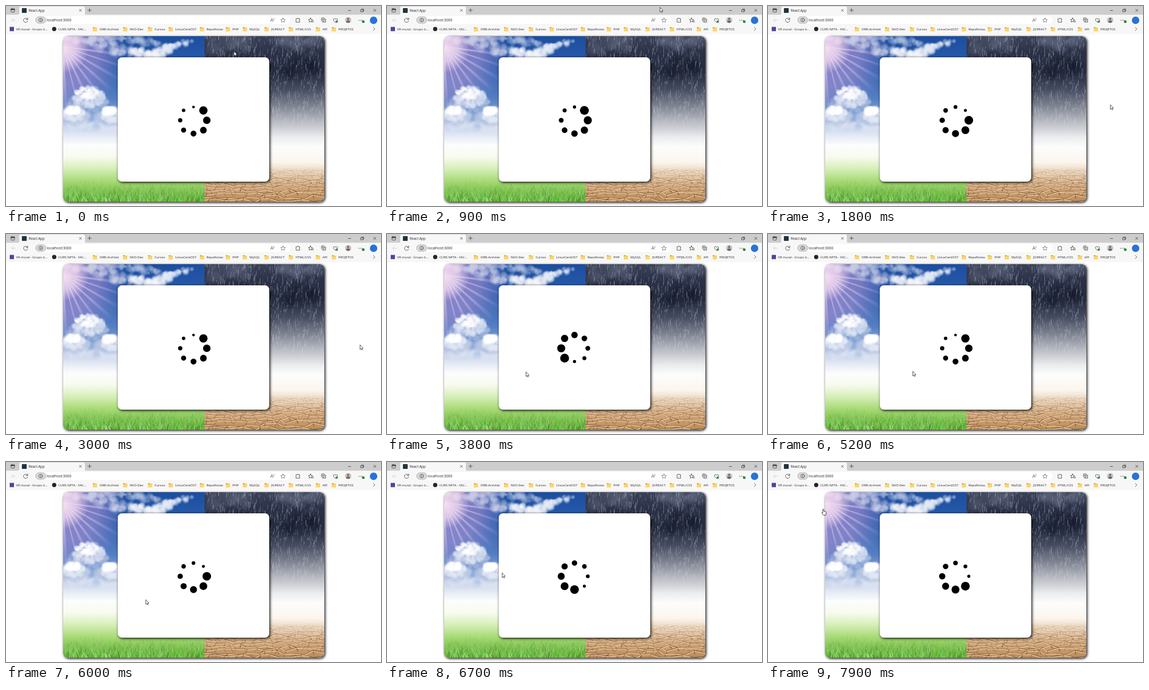
Recreate the animation shown at these times as an HTML page with a canvas. Size 708 by 378 pixels, loop 8000 ms.

```html
<!DOCTYPE html>
<html lang="pt">
<head>
<meta charset="utf-8">
<title>React App</title>
<style>
html, body { margin: 0; width: 708px; height: 378px; overflow: hidden; background: #fff; }
body { position: relative; font-family: "Open Sans", "Noto Sans", sans-serif; }
svg { position: absolute; left: 0; top: 0; }
.card { position: absolute; left: 107.5px; top: 57px; width: 493px; height: 313px; border-radius: 9px; box-shadow: 1.500px 1.500px 5px #000; }
.panel { position: absolute; left: 211px; top: 96.500px; width: 286px; height: 235.500px; border-radius: 8px; background: #fff; box-shadow: 1.500px 1.500px 5px #000; }
.line { fill: none; stroke: #333; stroke-width: .8; stroke-linecap: round; stroke-linejoin: round; }
#marks text { font-size: 6.1px; fill: #222; }
</style>
</head>
<body>
<canvas class="card" id="scene" width="493" height="313"></canvas>
<div class="panel"></div>

<svg width="708" height="378" viewBox="0 0 708 378">
  <rect width="708" height="17" fill="#cdcdcd"/>
  <rect y="16.5" width="708" height="36.5" fill="#f7f7f7"/>
  <path d="M22 17q3 0 3-3V4q0-3 3-3H146q3 0 3 3v10q0 3 3 3z" fill="#f7f7f7"/>
  <rect x="30" y="4" width="9" height="9" rx="1" fill="#20343d"/>
  <text x="43" y="10.6" font-size="6.4" fill="#222">React App</text>
  <rect x="53" y="19" width="484" height="15" rx="7.5" fill="#fff"/>
  <rect x="55.500" y="20" width="20" height="13" rx="6.5" fill="#d6d6d6" stroke="#aaa" stroke-width=".7"/>
  <text x="77" y="29.300" font-size="6.9" fill="#222">localhost:3000</text>

  <g class="line">
    <rect x="9.500" y="5" width="6.500" height="6.500" rx="1.200"/><path d="M9.500 6.500h6.500" stroke-width="2"/>
    <path d="M138.500 6.300l4 4m0-4l-4 4M154.500 8h6.500m-3.250-3.250v6.500"/>
    <path d="M646 8.500h5M670 7h4v4h-4zM671.300 7V5.800h4v4H674M694 6l4.500 4.500m0-4.500L694 10.500"/>
    <path d="M18 27h-7.500l3-3m-3 3l3 3" stroke="#c9c9c9"/>
    <path d="M40.600 25A4 4 0 1 0 41 28M41 22.500V25.500H38"/>
    <circle cx="65.500" cy="26.500" r="3.500" stroke-width=".7"/><path d="M65.500 26v2.400M65.500 24.500v.1"/>
    <path d="M499.500 29.500l2.500-6 2.500 6m-4.200-2h3.400M505.500 23q1.500 1.500 0 3.500" stroke="#666"/>
    <path d="M523 22.500l1.300 2.800 3.100.4-2.300 2.100.6 3-2.700-1.500-2.700 1.500.6-3-2.300-2.100 3.100-.4z" stroke="#666"/>
    <path d="M548 24h2q1-3 2 0h2.500v2q-3 .8 0 2v2.500H548z"/>
    <path d="M575 22.500l1.300 2.800 2.500.4-2 2 .4 2.600-2.200-1.300-2.700 1.500.6-3-2-1.800 2.800-.4zM578 28h2.500m-2 2h2"/>
    <rect x="595.500" y="22.500" width="6" height="6" rx="1.200"/><path d="M597.500 30.500h6v-6M598.500 24v3m-1.500-1.500h3"/>
    <path d="M622 31l-3.500-3.500q-1.200-4 2-3.800l1.500 1.300q1.500-2 3.500-.5 1.500 1.800 0 3.500z"/>
    <path d="M666 27h.1m2.900 0h.1m2.900 0h.1" stroke-width="1.300"/>
    <path d="M693.500 40.500l3 3-3 3"/>
  </g>
  <circle cx="624.500" cy="29.500" r="2.200" fill="#3b8c3f"/>
  <circle cx="646" cy="26.500" r="5.800" fill="#c4c1bf"/>
  <circle cx="646" cy="24.600" r="2" fill="#6d6966"/>
  <path d="M642.200 30.500q0-3.300 3.800-3.300t3.800 3.300q-3.800 2.800-7.600 0z" fill="#6d6966"/>
  <circle cx="674.500" cy="29.500" r="2.600" fill="#2f8b3a"/>
  <circle cx="694" cy="27" r="7" fill="#2872d8"/>

  <g id="marks">
    <rect x="7" y="39.500" width="8" height="8" fill="#50439b"/>
    <text x="19" y="46">VR mural - Grupo ó...</text>
    <circle cx="91" cy="43.500" r="4" fill="#252525"/>
    <text x="99" y="46">CURS NPTA - FAC...</text>
  </g>

  <g id="dots"></g>
  <g id="cursor">
    <path id="arrow" d="M.4.500V9.300L2.400 7.500 3.700 10.300 5 9.700 3.800 7H6.300z" fill="#fff" stroke="#222" stroke-width=".8" stroke-linejoin="round"/>
    <path id="hand" d="M2.500 7V1.500q1-1.500 2 0V5l3.500 1q1 .3 1 1.500L8 12.500H4L.6 8.500Q.4 6.500 2.500 8z" fill="#fff" stroke="#222" stroke-width=".9" stroke-linejoin="round"/>
  </g>
</svg>

<script>
const $ = id => document.getElementById(id);
const svgNode = (tag, attrs, parent) => {
  const node = document.createElementNS('http://www.w3.org/2000/svg', tag);
  for (const key in attrs) node.setAttribute(key, attrs[key]);
  return parent.appendChild(node);
};

// Bookmark folders
const folders = {
  'ORB-Architet': 164, 'NVO-Dev': 221, 'Cursos': 268, 'LinuxCentOS7': 307,
  'RepoNotas': 366, 'PHP': 415, 'MySQL': 447, 'JS/REACT': 488,
  'HTML/CSS': 534, 'API': 585, 'PROJETOS': 615
};
for (const name in folders) {
  const x = folders[name];
  svgNode('path', { d: `M${x} 40h3l1 1.200h4v6.300H${x}z`, fill: '#e2a92c' }, $('marks'));
  svgNode('rect', { x, y: 42, width: 8, height: 5.5, rx: .6, fill: '#ffd664' }, $('marks'));
  svgNode('text', { x: x + 12.5, y: 46 }, $('marks')).textContent = name;
}

// Weather backdrop
const ctx = $('scene').getContext('2d');
const SPLIT = 267, W = 493, H = 313;
let seed = 7;
const rand = (lo = 0, hi = 1) => {
  seed = (seed * 16807) % 2147483647;
  return lo + (hi - lo) * seed / 2147483647;
};
function sky(x, w, stops) {
  const g = ctx.createLinearGradient(0, 0, 0, H);
  for (const [at, color] of stops) g.addColorStop(at, color);
  ctx.fillStyle = g;
  ctx.fillRect(x, 0, w, H);
}
function puff(x, y, r, rgb, alpha) {
  const g = ctx.createRadialGradient(x, y, 0, x, y, r);
  g.addColorStop(0, `rgba(${rgb},${alpha})`);
  g.addColorStop(.55, `rgba(${rgb},${alpha * .7})`);
  g.addColorStop(1, `rgba(${rgb},0)`);
  ctx.fillStyle = g;
  ctx.fillRect(x - r, y - r, 2 * r, 2 * r);
}
// Ragged cloud: small puffs spread over a tilted ellipse
function cloud(x, y, w, h, n, rgb, alpha = .5, tilt = 0, size = 8) {
  ctx.save();
  ctx.translate(x, y);
  ctx.rotate(tilt);
  for (let i = 0; i < n; i++) {
    const a = rand(0, 2 * Math.PI), d = Math.sqrt(rand());
    puff(Math.cos(a) * d * w, Math.sin(a) * d * h, size * rand(.4, 1.2), rgb, alpha);
  }
  ctx.restore();
}
// Heaped cloud: blue-grey base, bright rounded top
function cumulus(x, y, w, h) {
  cloud(x, y + h * .5, w, h * .8, 60, '183,196,224', .4);
  cloud(x, y, w * .75, h * .9, 70, '226,232,245', .55, 0, 7);
  cloud(x - w * .1, y - h * .45, w * .5, h * .5, 40, '255,255,255', .75, 0, 6);
}
function stroke(x1, y1, x2, y2, color, width) {
  ctx.strokeStyle = color;
  ctx.lineWidth = width;
  ctx.beginPath();
  ctx.moveTo(x1, y1);
  ctx.lineTo(x2, y2);
  ctx.stroke();
}
function clipped(x, w, draw) {
  ctx.save();
  ctx.beginPath();
  ctx.rect(x, 0, w, H);
  ctx.clip();
  draw();
  ctx.restore();
}

function sunRays() {
  const g = ctx.createRadialGradient(0, 20, 5, 0, 20, 125);
  g.addColorStop(0, 'rgba(255,235,248,.7)');
  g.addColorStop(1, 'rgba(215,200,250,0)');
  ctx.fillStyle = g;
  for (let a = .1; a < 1.5; a += .2) {
    const spread = rand(.04, .1);
    ctx.beginPath();
    ctx.moveTo(0, 20);
    ctx.lineTo(140 * Math.cos(a), 20 + 140 * Math.sin(a));
    ctx.lineTo(140 * Math.cos(a + spread), 20 + 140 * Math.sin(a + spread));
    ctx.fill();
  }
}
function sunnySide() {
  sky(0, SPLIT, [[0, '#1d4d9f'], [.2, '#2a5fae'], [.38, '#5680c3'], [.5, '#93aedb'],
    [.59, '#dfe6f3'], [.66, '#fcfdfd'], [.73, '#f7fbee'], [.8, '#d6efb8'], [.88, '#a5d972'], [1, '#5aa733']]);
  puff(0, 30, 120, '172,146,212', .85);
  cloud(45, 4, 50, 8, 30, '196,186,222', .5);
  cloud(95, 22, 62, 10, 70, '200,206,230', .45, .3);
  cloud(130, 8, 55, 8, 45, '178,193,225', .45, .15);
  cloud(185, 30, 36, 7, 50, '238,241,249', .55, -.45);
  cloud(215, 17, 30, 4, 25, '226,234,248', .5, -.3, 6);
  cloud(152, 32, 28, 7, 35, '245,246,251', .5, .2);
  puff(0, 22, 48, '255,228,244', .9);
  sunRays();
  cloud(50, 166, 75, 18, 70, '221,228,242', .45, 0, 12);
  cumulus(48, 116, 40, 20);
  cumulus(20, 146, 28, 14);
  cumulus(90, 148, 24, 15);
  for (let i = 0; i < 1500; i++) {
    const near = Math.sqrt(rand()), y = 252 + 68 * near;
    const x = rand(0, SPLIT), len = 2 + near * 10;
    const color = `hsla(${rand(86, 112)},${rand(45, 70)}%,${rand(28, 80)}%,${near * near * .65})`;
    stroke(x, y, x + rand(-7, 7) * near, y - len, color, .5 + near * .7);
  }
}

function rainySide() {
  sky(SPLIT, W - SPLIT, [[0, '#3b4258'], [.1, '#2a3045'], [.22, '#262c40'], [.32, '#454b5f'], [.42, '#7d8290'],
    [.52, '#babdc4'], [.61, '#ebecee'], [.67, '#fdfdfd'], [.76, '#fbf6ee'], [.82, '#ecd7bf'], [.9, '#d3ab80'], [1, '#bb8b58']]);
  cloud(310, 18, 45, 14, 20, '92,101,124', .25, 0, 16);
  cloud(430, 60, 45, 18, 20, '20,25,42', .3, 0, 16);
  cloud(450, 8, 45, 10, 16, '105,114,138', .3, 0, 16);
  for (let i = 0; i < 1000; i++) {
    const x = rand(SPLIT, W), y = rand(-8, 160), len = rand(3, 12);
    stroke(x, y, x - len * .06, y + len, `rgba(218,225,240,${rand(.08, .5)})`, rand(.5, 1.1));
  }
  // Cracked soil: cells grow towards the viewer
  for (let row = 0; row < 16; row++) {
    const y = 248 + row * 2 + row * row * .17, h = 2.5 + row * .4, w = 5 + row * .9;
    const color = `rgba(92,55,28,${row * .048})`;
    let x = SPLIT - rand(0, w), py = y;
    while (x < W) {
      const nx = x + rand(.4, 1.4) * w, ny = y + rand(-.6, .6) * h;
      stroke(x, py + 1.3, nx, ny + 1.3, `rgba(255,228,192,${row * .05})`, 1.6);
      stroke(x, py, nx, ny, color, rand(.4, 1.5));
      stroke(nx, ny, nx + rand(-.5, .5) * w, ny + h, color, rand(.4, 1.3));
      x = nx;
      py = ny;
    }
  }
}
clipped(0, SPLIT, sunnySide);
clipped(SPLIT, W - SPLIT, rainySide);

// Motion
const LOOP = 8000, STEP = 100;
const spin = [[0, .2], [1800, -14.4], [3000, -23.8], [3800, -27.15], [5200, -39.8], [6700, -52.4], [7900, -61.3]];
const path = [[0, 430, 85], [300, 432, 80], [900, 515, 2], [1000, 535, 8], [1700, 646, 186], [1800, 646, 186],
  [2400, 668, 209], [3000, 668, 209], [3600, 290, 252], [3800, 262, 260], [4500, 270, 260],
  [5200, 273, 259], [6300, 260, 260], [6700, 217, 209], [7200, 112, 102], [7500, 102, 89], [7900, 101, 88]];

function sample(keys, t) {
  let i = 1;
  while (i < keys.length - 1 && keys[i][0] < t) i++;
  const a = keys[i - 1], b = keys[i], f = (t - a[0]) / (b[0] - a[0]);
  return a.slice(1).map((v, n) => v + (b[n + 1] - v) * f);
}

// Diagonal dots sit slightly outside the circle through the others
const dots = Array.from({ length: 8 }, (_, i) => {
  const angle = i * Math.PI / 4, radius = i % 2 ? 26.4 : 25.1;
  return svgNode('circle', {
    cx: 354 + radius * Math.sin(angle),
    cy: 216 - radius * Math.cos(angle)
  }, $('dots'));
});

const start = performance.now();
function frame(now) {
  const t = Math.floor(Math.max(0, now - start) % LOOP / STEP) * STEP;
  const [peak] = sample(spin, t);
  dots.forEach((dot, i) => {
    const age = ((i - peak) % 8 + 8) % 8;
    dot.setAttribute('r', 8.5 - .77 * age);
  });
  const [x, y] = sample(path, t);
  $('cursor').setAttribute('transform', `translate(${x} ${y})`);
  const pointing = t >= 7300;
  $('arrow').style.display = pointing ? 'none' : '';
  $('hand').style.display = pointing ? '' : 'none';
  requestAnimationFrame(frame);
}
frame(start);
</script>
</body>
</html>
```
